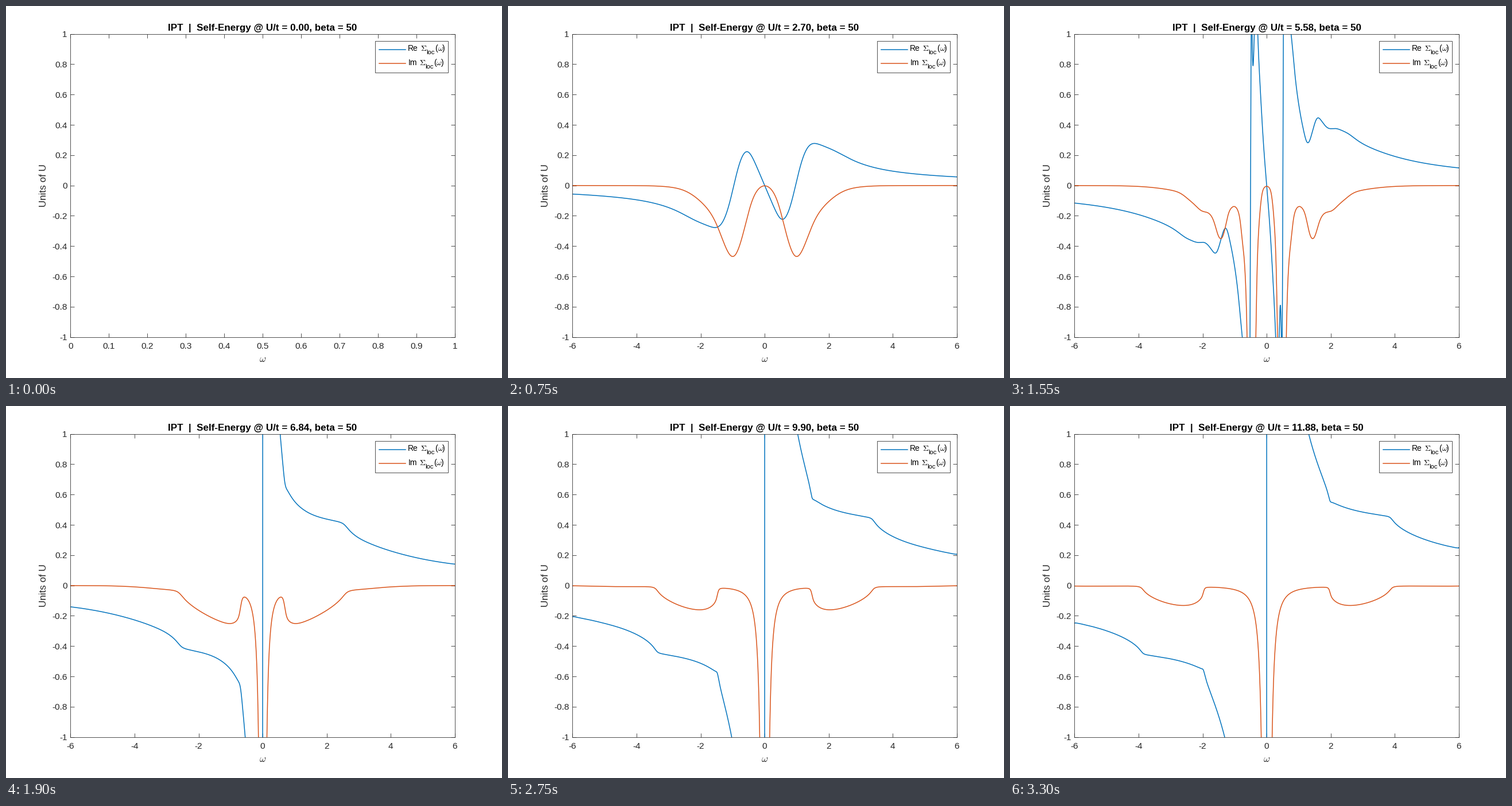
Write a matplotlib script that moves like this. It is 864x648 px and loops after 3.35 s.

```python
import numpy as np
import matplotlib.pyplot as plt
from matplotlib.animation import FuncAnimation
from matplotlib.lines import Line2D
from matplotlib.patches import Rectangle

W, H = 864, 648
FRAMES, STEP_MS = 67, 50
BLUE, ORANGE, INK = "#0072BD", "#D95319", "#262626"

plt.rcParams["font.family"] = "Liberation Sans"
plt.rcParams["mathtext.fontset"] = "cm"

# ---- Iterated perturbation theory, half-filled Bethe lattice (D = 1) ----
N, PAD, CUT = 4095, 8192, 6.0
BETA, DU = 50, 0.09

w = np.linspace(-CUT, CUT, N)
dw = w[1] - w[0]
z = w + 2j * dw
fermi = 1 / (1 + np.exp(BETA * w))

# Discrete Hilbert kernel with a period of four windows, wrapped for the FFT
odd = np.arange(1, N, 2)
period = 4 * (N + 1)
kernel = np.zeros(PAD)
kernel[odd] = 2 / period / np.tan(np.pi * odd / period)
kernel[-odd] = -kernel[odd]
kernel_ft = np.fft.rfft(kernel)


def bethe(x):
    return 2 * (x - np.sqrt(x - 1) * np.sqrt(x + 1))


def self_energy(g, u):
    """Second-order self-energy from the bath propagator."""
    bath = -np.imag(1 / (z - g / 4)) / np.pi
    cube = np.fft.irfft(np.fft.rfft(bath * fermi, PAD) ** 3, PAD)
    cube = cube[N - 1:2 * N - 1] * dw ** 2
    im = np.minimum(-np.pi * u ** 2 * (cube + cube[::-1]), 0)
    re = -np.fft.irfft(np.fft.rfft(im, PAD) * kernel_ft, PAD)[:N]
    return re + 1j * im


def solve(g, u, mix=0.8, tol=1e-4, max_iter=150):
    for _ in range(max_iter):
        sigma = self_energy(g, u)
        step = bethe(z - sigma) - g
        g = g + mix * step
        if np.abs(step).max() < tol:
            break
    return g, sigma


def sweep():
    g, curves = bethe(z), [None]
    for k in range(1, FRAMES):
        u = k * DU
        g, sigma = solve(g, u)
        curves.append(sigma / u)
    return curves


curves = sweep()

# ---- Figure: one point equals one pixel ----
fig = plt.figure(figsize=(W / 72, H / 72), dpi=72, facecolor="white")
ax = fig.add_axes([0.13, 0.11, 0.775, 0.815])
ax.set_ylim(-1, 1)
ax.set_yticks(np.arange(-10, 11, 2) / 10)
for axis in (ax.xaxis, ax.yaxis):
    axis.set_major_formatter(lambda v, pos: f"{v:g}")
ax.tick_params(direction="in", top=True, right=True, length=6.7, width=0.8,
               color=INK, labelcolor=INK, labelsize=15.4)
ax.tick_params(axis="x", pad=9.6)
ax.tick_params(axis="y", pad=5.6)
for spine in ax.spines.values():
    spine.set(color=INK, linewidth=0.8)

re_line, = ax.plot([], [], color=BLUE, lw=1.5)
im_line, = ax.plot([], [], color=ORANGE, lw=1.5)


def label(x, y, text, size, color="black", **kw):
    return fig.text(x / W, 1 - y / H, text, fontsize=size, color=color,
                    **{"va": "baseline", "ha": "left", **kw})


title = label(447.1, 43, "", 17, weight="bold", ha="center")
label(447.1, 619.5, r"$\omega$", 17, INK, ha="center")
label(70, 313, "Units of U", 17, INK, rotation=90, rotation_mode="anchor",
      ha="center")


def legend_row(y, base, name, x_sym, color):
    fig.add_artist(Line2D([649.5 / W, 696 / W], [1 - y / H] * 2,
                          color=color, lw=1.5))
    label(700.3, base, name, 13.9)
    label(x_sym, base, r"$\Sigma$", 13.9)
    label(x_sym + 10.5, base + 5.5, "loc", 11.2)
    label(x_sym + 25.2, base, "(", 13.9)
    label(x_sym + 29.6, base, r"$\omega$", 13.9)
    label(x_sym + 38, base, ")", 13.9)


fig.add_artist(Rectangle((643.4 / W, 1 - 115.6 / H), 127 / W, 55 / H,
                         facecolor="white", edgecolor=INK, lw=0.8))
legend_row(76, 78.3, "Re", 722, BLUE)
legend_row(100.3, 103.3, "Im", 719.8, ORANGE)


def update(k):
    title.set_text(f"IPT  |  Self-Energy @ U/t = {2 * k * DU:.2f}, beta = {BETA}")
    sigma = curves[k]
    if sigma is None:
        ax.set_xlim(0, 1)
        ax.set_xticks(np.arange(11) / 10)
        re_line.set_data([], [])
        im_line.set_data([], [])
    else:
        ax.set_xlim(-CUT, CUT)
        ax.set_xticks(np.arange(-6, 7, 2))
        re_line.set_data(w, sigma.real)
        im_line.set_data(w, sigma.imag)
    return re_line, im_line, title


anim = FuncAnimation(fig, update, frames=FRAMES, interval=STEP_MS,
                     repeat=True, repeat_delay=0, blit=False)
plt.show()
```
